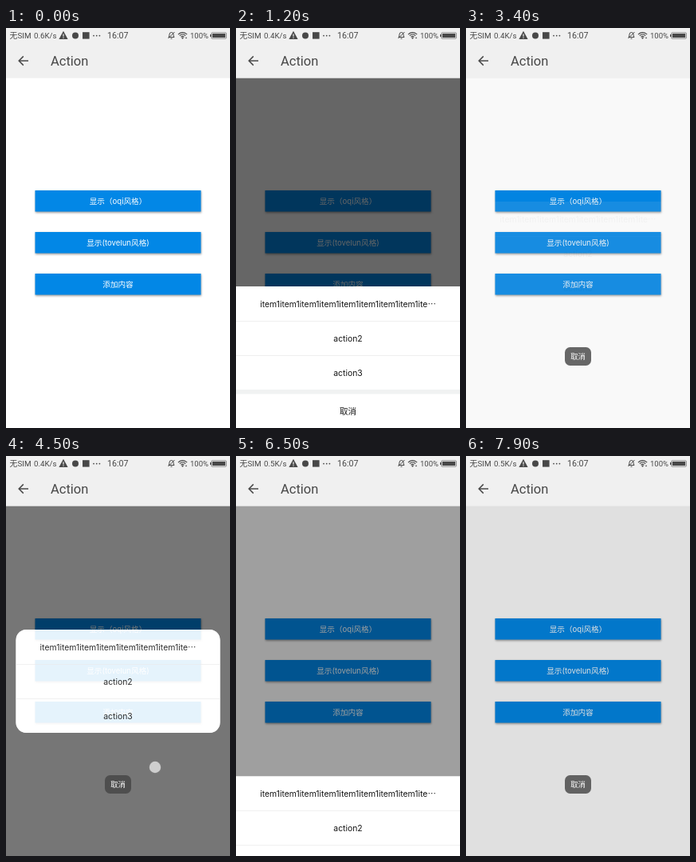
Recreate the animation shown at these times as an HTML page with a canvas. Size 281 by 500 pixels, loop 8 s.

```html
<!DOCTYPE html>
<html lang="zh">
<head>
<meta charset="utf-8">
<title>Action</title>
<style>
html, body { margin: 0; width: 100%; height: 100%; overflow: hidden; background: #fff; }
canvas { display: block; width: 281px; height: 500px; }
</style>
</head>
<body>
<canvas id="stage"></canvas>
<script>
const W = 281, H = 500, LOOP = 8000, BAR = 62.5, ROW = 43;
const FONT = 'Roboto, "Noto Sans CJK SC", "Noto Sans CJK", sans-serif';
const LIST_FONT = 'Inter, "Noto Sans CJK SC", "Noto Sans CJK", sans-serif';
const INK = '#484848';
const BUTTONS = ['显示（oqi风格）', '显示(tovelun风格)', '添加内容'];

const sheets = [
  { open: 790, close: 2450 },
  { open: 6389, close: 7662 }
];
const dialog = { open: 3390, close: 4470 };
const toasts = [[2540, 6000], [7750, 9000]];
// x, y, start, end
const touches = [
  [172, 217, 480, 700],
  [160, 479, 2190, 2440],
  [172, 269, 3050, 3300],
  [187, 389, 4480, 4720],
  [170, 322, 5290, 5560],
  [172, 217, 6130, 6330],
  [160, 479, 7560, 7680]
];

const canvas = document.getElementById('stage');
const ctx = canvas.getContext('2d');
const dpr = window.devicePixelRatio || 1;
canvas.width = W * dpr;
canvas.height = H * dpr;

const clamp = v => Math.max(0, Math.min(1, v));
const ramp = (t, start, length) => clamp((t - start) / length);
const easeOut = (x, power) => 1 - Math.pow(1 - x, power);

function rect(x, y, w, h, color) {
  ctx.fillStyle = color;
  ctx.fillRect(x, y, w, h);
}

function roundRect(x, y, w, h, r) {
  ctx.beginPath();
  ctx.roundRect(x, y, w, h, r);
}

function disc(x, y, r, color) {
  ctx.fillStyle = color;
  ctx.beginPath();
  ctx.arc(x, y, r, 0, Math.PI * 2);
  ctx.fill();
}

function line(points, width, color = INK) {
  ctx.strokeStyle = color;
  ctx.lineWidth = width;
  ctx.beginPath();
  points.forEach(([x, y]) => ctx.lineTo(x, y));
  ctx.stroke();
}

function text(str, x, y, size, color, align = 'center', family = LIST_FONT) {
  ctx.font = size + 'px ' + family;
  ctx.fillStyle = color;
  ctx.textAlign = align;
  ctx.textBaseline = 'alphabetic';
  ctx.fillText(str, x, y);
}

function drawPage() {
  rect(0, BAR, W, H - BAR, '#fff');
  BUTTONS.forEach((label, i) => {
    const y = 203 + i * 52;
    ctx.save();
    ctx.shadowColor = 'rgba(0,0,0,.38)';
    ctx.shadowBlur = 2.5 * dpr;
    ctx.shadowOffsetY = 1.2 * dpr;
    rect(36.5, y, 208, 26.5, '#0287e6');
    ctx.restore();
    text(label, 140.5, y + 17, 9.6, '#fff');
  });
}

function drawBell() {
  ctx.strokeStyle = INK;
  ctx.lineWidth = 1;
  ctx.beginPath();
  ctx.moveTo(204, 11.5);
  ctx.quadraticCurveTo(205, 10, 205, 8);
  ctx.arc(207.5, 8, 2.5, Math.PI, 0);
  ctx.quadraticCurveTo(210, 10, 211, 11.5);
  ctx.closePath();
  ctx.stroke();
  line([[206.5, 13.2], [208.5, 13.2]], 1);
  line([[203.5, 13], [211.5, 5]], 1);
}

function drawWifi() {
  ctx.strokeStyle = INK;
  ctx.lineWidth = 1.1;
  [2.6, 5, 7.4].forEach(r => {
    ctx.beginPath();
    ctx.arc(221.5, 13, r, -Math.PI * .77, -Math.PI * .23);
    ctx.stroke();
  });
  disc(221.5, 12.6, 1.1, INK);
  disc(226, 12.4, .8, INK);
}

function drawHeader(t) {
  rect(0, 0, W, BAR, '#f0f0f0');
  const speed = t < 1000 ? 0.6 : t < 5900 ? 0.4 : 0.5;
  text('无SIM', 4.5, 13.2, 9.9, INK, 'left', FONT);
  text(speed + 'K/s', 35, 13.2, 9.7, INK, 'left', FONT);

  ctx.fillStyle = INK;
  ctx.beginPath();
  ctx.moveTo(72, 3.8);
  ctx.lineTo(77.6, 14);
  ctx.lineTo(66.4, 14);
  ctx.fill();
  rect(71.4, 7.4, 1.2, 3.3, '#f0f0f0');
  rect(71.4, 11.6, 1.2, 1.2, '#f0f0f0');
  disc(87, 9.4, 4, INK);
  rect(96, 5.2, 8.6, 8.4, INK);
  [110, 113.7, 117.4].forEach(x => disc(x, 9.6, .9, INK));

  text('16:07', 127, 13.4, 10.7, INK, 'left', FONT);
  drawBell();
  drawWifi();
  text('100%', 231, 13, 9.5, INK, 'left', FONT);
  rect(256, 8, 1.6, 3, INK);
  ctx.strokeStyle = '#777';
  ctx.lineWidth = .8;
  roundRect(257.6, 5.8, 18.8, 7.4, 1);
  ctx.stroke();
  rect(258.8, 7, 16.4, 5, INK);

  line([[28, 41], [16.4, 41]], 1.5);
  line([[21.8, 35.4], [16.2, 41], [21.8, 46.6]], 1.5);
  text('Action', 56, 47.2, 16.5, INK, 'left', FONT);
}

function drawRows(x, y, w, count) {
  const labels = ['item1'.repeat(count) + 'ite⋯', 'action2', 'action3'];
  labels.forEach((label, i) => {
    const top = y + i * ROW;
    if (i) rect(x, top, w, .8, '#ececec');
    text(label, 140.5, top + 26, 10.4, '#161616');
  });
}

function drawSheet(shown) {
  const y = H - 177 * shown;
  rect(0, y, W, 177, '#fff');
  drawRows(0, y, W, 8);
  rect(0, y + 129, W, 5.5, '#f0f2f2');
  text('取消', 140.5, y + 160, 10.6, '#161616');
}

function drawDialog(alpha) {
  ctx.save();
  roundRect(12.5, 217, 256, 129, 13);
  ctx.clip();
  ctx.globalAlpha = Math.min(1, alpha * 1.5);
  drawPage();
  ctx.globalAlpha = alpha;
  rect(0, 200, W, 160, '#fff');
  drawRows(12.5, 217, 256, 7);
  ctx.restore();
}

function drawToast(alpha) {
  ctx.save();
  ctx.globalAlpha = alpha;
  ctx.fillStyle = 'rgba(70,70,70,.81)';
  roundRect(124, 399, 33, 23, 6.5);
  ctx.fill();
  text('取消', 140.5, 414, 9.3, '#fff');
  ctx.restore();
}

function drawTouch(x, y, alpha) {
  ctx.save();
  ctx.globalAlpha = alpha;
  disc(x, y, 8.6, 'rgba(130,130,130,.3)');
  disc(x, y, 7.2, 'rgba(228,228,228,.8)');
  ctx.restore();
}

function render(t) {
  ctx.setTransform(dpr, 0, 0, dpr, 0, 0);
  drawPage();

  const fade = ramp(t, dialog.open, 300) * (1 - ramp(t, dialog.close, 300));
  let dim = fade, shown = 0;
  for (const s of sheets) {
    const x = ramp(t, s.open, 330);
    dim = Math.max(dim, easeOut(x, 2.4) * (1 - ramp(t, s.close, 300)));
    shown = Math.max(shown, easeOut(x, 2) * (1 - Math.pow(ramp(t, s.close, 230), 1.5)));
  }
  rect(0, BAR, W, H - BAR, `rgba(0,0,0,${0.6 * dim})`);
  drawHeader(t);
  if (shown > 0) drawSheet(shown);
  if (fade > 0) drawDialog(fade);

  for (const [start, end] of toasts) {
    const a = ramp(t, start, 120) * (1 - ramp(t, end, 200));
    if (a > 0) drawToast(a);
  }
  for (const [x, y, start, end] of touches) {
    if (t >= start && t < end) drawTouch(x, y, 1 - ramp(t, end - 80, 80));
  }
}

const begin = performance.now();
function tick() {
  render((performance.now() - begin) % LOOP);
  requestAnimationFrame(tick);
}
tick();
</script>
</body>
</html>
```
